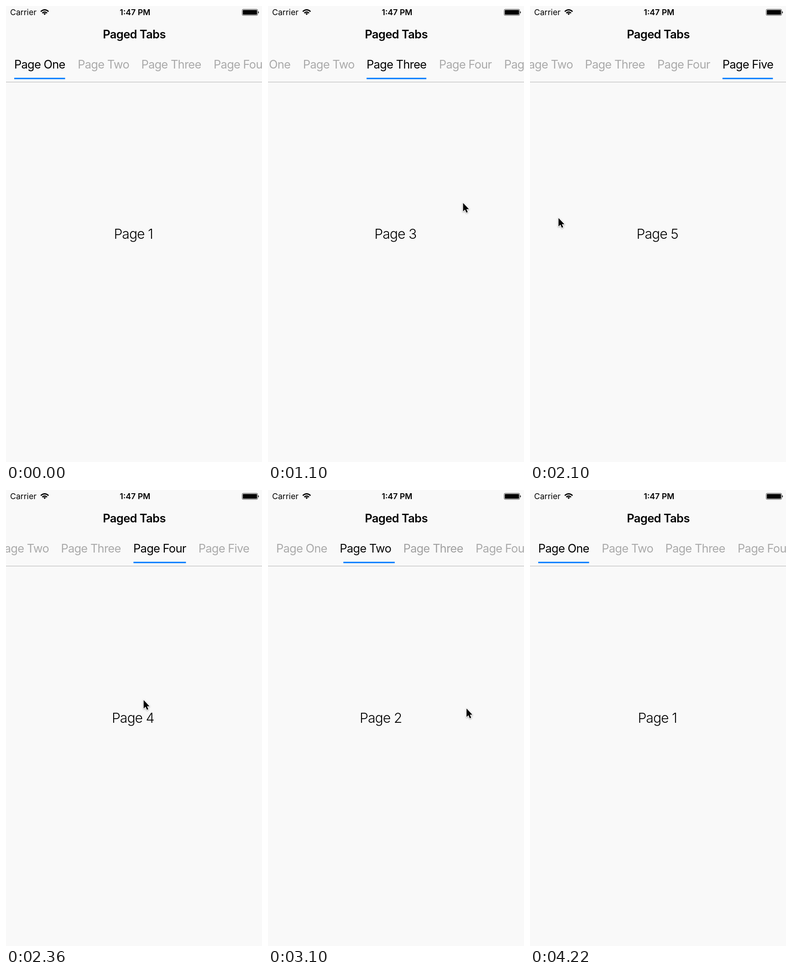
Recreate the animation shown at these times as an HTML page. Size 561 px wide and 999 px high, loop 4.34 s.

```html
<!DOCTYPE html>
<html lang="en">
<head>
<meta charset="utf-8">
<title>Paged Tabs</title>
<style>
  html, body { margin: 0; width: 100%; height: 100%; overflow: hidden; background: #f9f9f9; }
  svg { display: block; width: 561px; height: 999px; font-family: Inter, "Open Sans", sans-serif; }
  .status { font-size: 17.7px; }
  .title { font-size: 25.4px; font-weight: 600; letter-spacing: -0.55px; }
  .tab { font-size: 25.4px; letter-spacing: -0.7px; }
  .page { font-size: 30px; font-weight: 300; letter-spacing: -0.9px; }
  .mid { text-anchor: middle; }
</style>
</head>
<body>
<svg viewBox="0 0 561 999">
  <rect width="561" height="999" fill="#f9f9f9"/>
  <text class="status" x="9" y="20.3">Carrier</text>
  <g fill="none" stroke="#000" stroke-width="2.5">
    <path d="M76.2 12.2Q84.7 4.6 93.2 12.2"/>
    <path d="M79.4 15.6Q84.7 10.6 90 15.6"/>
    <path d="M81.9 16.6Q84.7 14.4 87.5 16.6L84.7 20Z" fill="#000" stroke="none"/>
  </g>
  <text class="status mid" x="282.8" y="20.3" font-weight="600">1:47 PM</text>
  <rect x="517.5" y="7.2" width="34" height="13.4" rx="2.4" fill="none" stroke="#444"/>
  <rect x="519" y="8.7" width="31" height="10.4" rx="1"/>
  <path d="M552.6 11.5q1.6 .5 1.6 2.4t-1.6 2.4z"/>
  <text class="title mid" x="281" y="70.5">Paged Tabs</text>
  <g id="tabs">
    <rect id="bar" y="157.3" height="3" fill="#007aff"/>
  </g>
  <rect y="166" width="561" height="1.2" fill="#bebebe"/>
  <g id="pages"></g>
  <g id="cursor" style="filter:drop-shadow(0 1.5px 1.5px rgba(0,0,0,.35))">
    <path d="M.5 1.5v18.5l4.2-3.9l3 6.7l3-1.3l-2.9-6.6h5.5z"
      stroke="#fff" stroke-width="2.4" stroke-linejoin="round" paint-order="stroke"/>
  </g>
</svg>
<script>
const LOOP = 4340, W = 561;
const MARGIN = 18, GAP = 27.7, MAX_SCROLL = 176;
const SWIPE = 260, DRAG = 150, REACH = 370, REST = 100, HIDE = 3460;

// each swipe: start time and the point where the pointer grips the page
const swipes = [
  [200, 456, 418], [760, 456, 422], [1200, 427, 430], [1640, 420, 446],
  [2140, 62, 463], [2567, 62, 451], [2940, 69, 477], [3360, 69, 505]
].map(([at, x, y], i) => ({ at, x, y, dir: i < 4 ? 1 : -1 }));

const $ = id => document.getElementById(id);
const clamp = (v, lo, hi) => Math.min(hi, Math.max(lo, v));
const part = (t, from, to) => clamp((t - from) / (to - from), 0, 1);
const mix = (a, b, k) => a + (b - a) * k;
const smooth = k => k * k * (3 - 2 * k);
const easeOut = k => 1 - (1 - k) ** 2;
// a drag that picks up speed, then settles on the page
const flick = u => 1 - (1 - u ** 1.4) ** 4;
const shift = (el, x, y = 0) => el.setAttribute('transform', `translate(${x} ${y})`);

function addText(parent, cls, x, y, str) {
  const el = document.createElementNS('http://www.w3.org/2000/svg', 'text');
  el.setAttribute('class', cls);
  el.setAttribute('x', x);
  el.setAttribute('y', y);
  el.textContent = str;
  return parent.appendChild(el);
}

const widths = { One: 111.5, Two: 111.5, Three: 131, Four: 115, Five: 110.5 };
let left = MARGIN;
const tabs = Object.entries(widths).map(([name, w], i) => {
  const x = left;
  left += w + GAP;
  addText($('pages'), 'page mid', 279.2 + i * W, 509.7, 'Page ' + (i + 1));
  return { x, w, el: addText($('tabs'), 'tab', x, 136.7, 'Page ' + name) };
});

const pageAt = t =>
  swipes.reduce((p, s) => p + s.dir * flick(part(t, s.at, s.at + SWIPE)), 0);

function drawCursor(t) {
  const shown = t >= swipes[0].at && t < HIDE;
  $('cursor').style.display = shown ? '' : 'none';
  if (!shown) return;
  const i = swipes.findLastIndex(s => s.at <= t);
  const s = swipes[i], next = swipes[i + 1] || s;
  const dragged = s.x - s.dir * REACH * easeOut(part(t, s.at, s.at + DRAG));
  // after the release the pointer moves to the next grip and waits
  const back = next === s ? 0 : smooth(part(t, s.at + DRAG, next.at - REST));
  shift($('cursor'), mix(dragged, next.x, back), mix(s.y, next.y, back));
}

function draw(t) {
  const pos = pageAt(t);
  const i = clamp(Math.floor(pos), 0, tabs.length - 2);
  const a = tabs[i], b = tabs[i + 1];
  const x = mix(a.x, b.x, pos - i), w = mix(a.w, b.w, pos - i);
  $('bar').setAttribute('x', x);
  $('bar').setAttribute('width', w);
  shift($('tabs'), -clamp(x + w / 2 - 281.5, 0, MAX_SCROLL));
  shift($('pages'), -pos * W);
  tabs.forEach(({ el }, n) => {
    const c = Math.round(170 * Math.min(1, Math.abs(pos - n)));
    el.setAttribute('fill', `rgb(${c},${c},${c})`);
  });
  drawCursor(t);
}

const start = performance.now();
function tick() {
  draw((performance.now() - start) % LOOP);
  requestAnimationFrame(tick);
}
tick();
</script>
</body>
</html>
```
